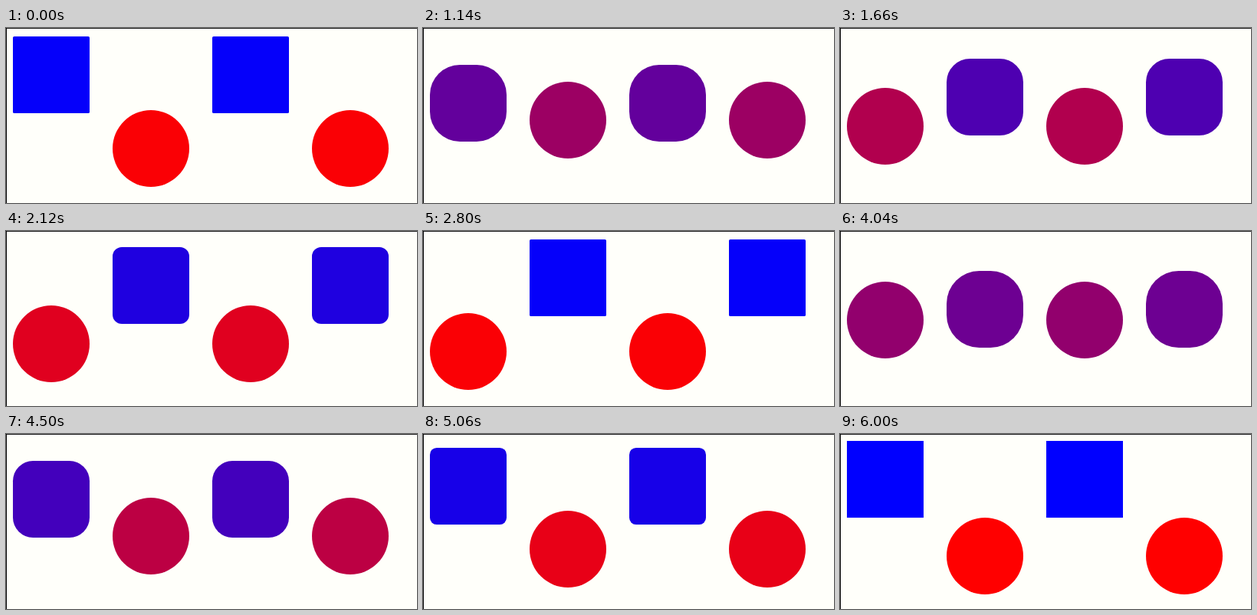
These frames come from a looping animation (536x228 px, 6020 ms). An HTML page with a canvas:

```html
<!DOCTYPE html>
<html lang="en">
<head>
<meta charset="utf-8">
<title>Morphing squares and circles</title>
<style>
  html, body { margin: 0; width: 100%; height: 100%; overflow: hidden; background: #fffffa; }
  canvas { display: block; }
</style>
</head>
<body>
<canvas id="stage" width="536" height="228"></canvas>
<script>
const ctx = document.getElementById('stage').getContext('2d');
const LOOP = 6020, SIZE = 100, TOP = 9, LEFT = 9, PITCH = 130;
const HALF = 60;      // steps from one extreme to the other
const START = 10.5;   // step at which the first rise begins

// The playback cadence is 100, 20, 20 ms after one opening step of 20 ms.
function stepAt(ms) {
  if (ms < 20) return 0;
  const rest = (ms - 20) % 140;
  const cycle = Math.floor((ms - 20) / 140);
  return 1 + cycle * 3 + (rest < 100 ? 0 : rest < 120 ? 1 : 2);
}

// cubic-bezier(.25, .1, .25, 1)
function ease(x) {
  let lo = 0, hi = 1, s = 0.5;
  for (let i = 0; i < 24; i++) {
    s = (lo + hi) / 2;
    if (0.75 * s * (1 - s) + s ** 3 < x) lo = s; else hi = s;
  }
  return 0.3 * s * (1 - s) ** 2 + 3 * s * s * (1 - s) + s ** 3;
}

function progressAt(step) {
  const pos = (step - START) / HALF;
  const leg = Math.floor(pos);
  const eased = ease(pos - leg);
  return leg % 2 === 0 ? eased : 1 - eased;
}

// p = 0 is a blue square at the top, p = 1 a red circle at the bottom.
function drawShape(column, p) {
  ctx.fillStyle = `rgb(${Math.round(255 * p)}, 0, ${Math.round(255 * (1 - p))})`;
  ctx.beginPath();
  ctx.roundRect(LEFT + column * PITCH, Math.round(TOP + 100 * p),
    SIZE, SIZE, Math.min(SIZE / 2, SIZE * p));
  ctx.fill();
}

function draw(ms) {
  const p = progressAt(stepAt(ms % LOOP));
  ctx.fillStyle = '#fffffa';
  ctx.fillRect(0, 0, 536, 228);
  ctx.fillStyle = '#242424';
  ctx.fillRect(0, 0, 536, 1);
  ctx.fillStyle = '#000';
  ctx.fillRect(0, 0, 1, 228);
  for (let i = 0; i < 4; i++) drawShape(i, i % 2 ? 1 - p : p);
}

const origin = performance.now();
function tick() {
  draw(performance.now() - origin);
  requestAnimationFrame(tick);
}
tick();
</script>
</body>
</html>
```
